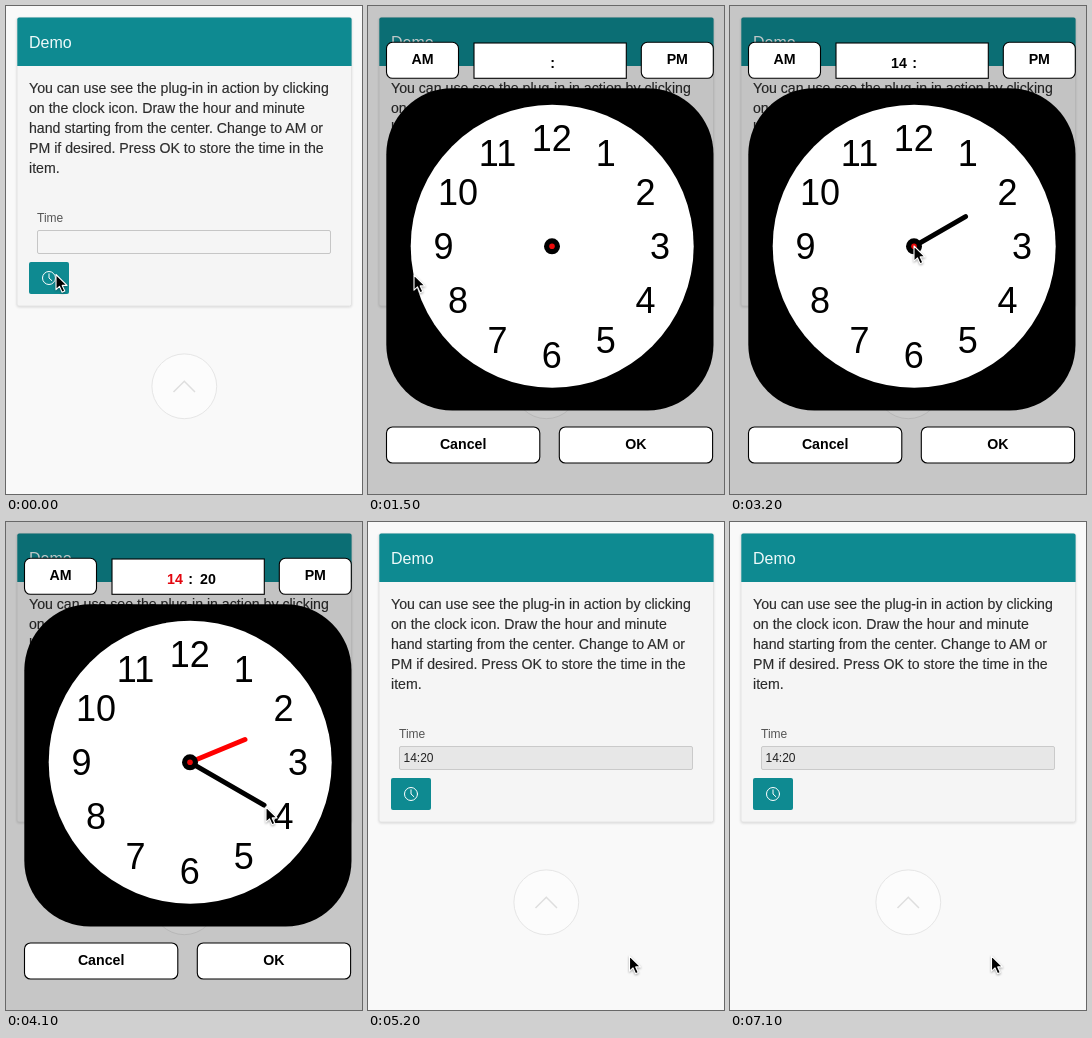
Write an HTML page that moves like this. It is 356 by 488 pixels and loops after 7200 ms.

```html
<!DOCTYPE html>
<html lang="en">
<head>
<meta charset="utf-8">
<title>Draw a time</title>
<style>
  html, body { margin: 0; width: 100%; height: 100%; overflow: hidden; background: #f9f9f9; }
  svg { display: block; width: 100%; height: 100%; }
  text { font-family: "Liberation Sans", Arial, sans-serif; }
  .teal { fill: #0e8a91; }
  .body { font-size: 14.15px; fill: #2b2b2b; stroke: #2b2b2b; stroke-width: .15px; }
  .field { fill: #f5f5f5; stroke: #c6c6c6; }
  .field.focus { fill: #fff; stroke: #0e8a91; }
  .field.filled { fill: #e7e7e7; stroke: #cacaca; }
  .card { filter: drop-shadow(0 1px 1px rgba(0, 0, 0, .12)); }
  .icon { fill: none; stroke: #fff; stroke-linecap: round; }
  .box { fill: #fff; stroke: #000; stroke-width: 1.1px; }
  .label { font-size: 14.2px; font-weight: bold; text-anchor: middle; }
  .digit { font-size: 36px; text-anchor: middle; }
  .hand { stroke: #000; stroke-width: 5px; stroke-linecap: round; }
  .set .hour { stroke: #f00; }
  .set .hourText { fill: #e3060f; }
  #cursor { filter: drop-shadow(0 1px 1px rgba(0, 0, 0, .35)); }
</style>
</head>
<body>
<svg viewBox="0 0 356 488">
  <rect width="356" height="488" fill="#f9f9f9"/>

  <g class="card">
    <rect x="11" y="11.5" width="334.5" height="288.5" rx="2" fill="#f5f5f5" stroke="#e4e4e4"/>
    <path class="teal" d="M11.3 60V13.5q0-2 2-2H343.6q2 0 2 2V60Z"/>
  </g>
  <text x="23" y="41.5" font-size="16" fill="#eefafa">Demo</text>
  <text class="body">
    <tspan x="23" y="87">You can use see the plug-in in action by clicking</tspan>
    <tspan x="23" y="107">on the clock icon. Draw the hour and minute</tspan>
    <tspan x="23" y="127">hand starting from the center. Change to AM or</tspan>
    <tspan x="23" y="147">PM if desired. Press OK to store the time in the</tspan>
    <tspan x="23" y="167">item.</tspan>
  </text>
  <text x="31" y="216" font-size="12" fill="#555">Time</text>
  <rect id="field" class="field" x="31.5" y="224.5" width="293" height="23" rx="1.5"/>
  <path id="caret" d="M36 229V243" stroke="#222"/>
  <text id="value" x="35.5" y="240" font-size="12" fill="#222">14:20</text>

  <rect class="teal" x="23" y="256" width="40" height="32" rx="2"/>
  <g class="icon">
    <circle cx="43" cy="272" r="6.5"/>
    <path d="M43 267.8V272L45.8 274.6"/>
  </g>

  <circle cx="178.3" cy="380.3" r="32.4" fill="#fcfcfc" stroke="#e6e6e6"/>
  <path d="M167.5 386L178.3 375.3L189 386" fill="none" stroke="#dedede" stroke-width="1.5"/>

  <g id="dialog">
    <rect width="356" height="488" opacity=".205"/>
    <g id="buttons"></g>
    <rect class="box" x="106" y="37" width="152.3" height="35.3"/>
    <text id="hourText" class="label hourText" x="169" y="61.7">14</text>
    <text class="label" x="184.7" y="61.7">:</text>
    <text id="minuteText" class="label" x="202" y="61.7">20</text>
    <rect x="18.3" y="82.3" width="327.2" height="322.2" rx="66"/>
    <circle cx="184.2" cy="240.2" r="141.5" fill="#fff"/>
    <g id="digits"></g>
    <line id="hour" class="hand hour"/>
    <line id="minute" class="hand"/>
    <circle cx="184" cy="240.3" r="8"/>
    <circle cx="184" cy="240.3" r="2.8" fill="#ee0a0a"/>
  </g>

  <path id="cursor" d="M0 0V15.2L3.5 11.9L6.1 17.8L8.8 16.6L6.2 10.9H11Z"
        stroke="#fff" stroke-width="1.1" stroke-linejoin="round"/>
</svg>
<script>
  const LOOP = 7200, STEP = 100;
  const HUB = [184, 240.3];
  const $ = id => document.getElementById(id);

  function add(parent, tag, attrs, text = '') {
    const el = document.createElementNS('http://www.w3.org/2000/svg', tag);
    for (const key in attrs) el.setAttribute(key, attrs[key]);
    el.textContent = text;
    parent.append(el);
  }

  function addButton(label, x, y, width) {
    add($('buttons'), 'rect', { class: 'box', x, y, width, height: 36, rx: 6 });
    add($('buttons'), 'text', { class: 'label', x: x + width / 2, y: y + 21.6 }, label);
  }
  addButton('AM', 18.5, 36.3, 72);
  addButton('PM', 273.3, 36.3, 72);
  addButton('Cancel', 18.5, 421, 153.3);
  addButton('OK', 191.3, 421, 153.3);

  // Point at a clock angle in degrees around a centre
  function polar([cx, cy], angle, radius) {
    const a = angle * Math.PI / 180;
    return [cx + radius * Math.sin(a), cy - radius * Math.cos(a)];
  }

  for (let n = 1; n <= 12; n++) {
    const [x, y] = polar([183.7, 240.4], n * 30, 108.3);
    add($('digits'), 'text', { class: 'digit', x, y: y + 12.9 }, n);
  }

  // Pointer moves: first step, last step, destination
  const START = [50, 268.5];
  const MOVES = [
    [100, 400, [51, 268.5]],
    [1000, 1100, [46, 269]],
    [1700, 2200, [184, 240]],
    [2400, 2700, [236, 210]],
    [2900, 3200, [184, 240]],
    [3400, 3400, [183.3, 239.5]],
    [3600, 4000, [260, 285]],
    [4300, 5000, [261.5, 434]]
  ];
  const ease = p => p * p * (3 - 2 * p);

  function pointer(t) {
    let pos = START;
    for (const [first, last, to] of MOVES) {
      if (t < first) break;
      const p = ease(Math.min(1, (t - first + STEP) / (last - first + STEP)));
      pos = pos.map((v, i) => v + (to[i] - v) * p);
    }
    return pos;
  }

  function show(id, visible) {
    $(id).style.display = visible ? '' : 'none';
  }

  function drawHand(id, [x, y]) {
    const ends = { x1: HUB[0], y1: HUB[1], x2: x, y2: y };
    for (const key in ends) $(id).setAttribute(key, ends[key]);
  }

  function draw(time) {
    const t = Math.floor(time % LOOP / STEP) * STEP;
    const pos = pointer(t);
    const hourSet = t >= 2800, minuteSet = t >= 4100;
    const focused = t >= 1400 && t < 5200, filled = t >= 5200;

    $('cursor').setAttribute('transform', `translate(${pos})`);
    $('field').classList.toggle('focus', focused);
    $('field').classList.toggle('filled', filled);
    show('caret', focused);
    show('value', filled);

    show('dialog', t >= 1500 && t < 5200);
    $('dialog').classList.toggle('set', minuteSet);
    show('hourText', hourSet);
    show('minuteText', minuteSet);
    show('hour', t >= 2400);
    show('minute', t >= 3600);
    drawHand('hour', hourSet ? polar(HUB, minuteSet ? 67.5 : 60, 59.5) : pos);
    drawHand('minute', minuteSet ? polar(HUB, 120, 85.5) : pos);
  }

  const begin = performance.now();
  function frame() {
    draw(performance.now() - begin);
    requestAnimationFrame(frame);
  }
  frame();
</script>
</body>
</html>
```
